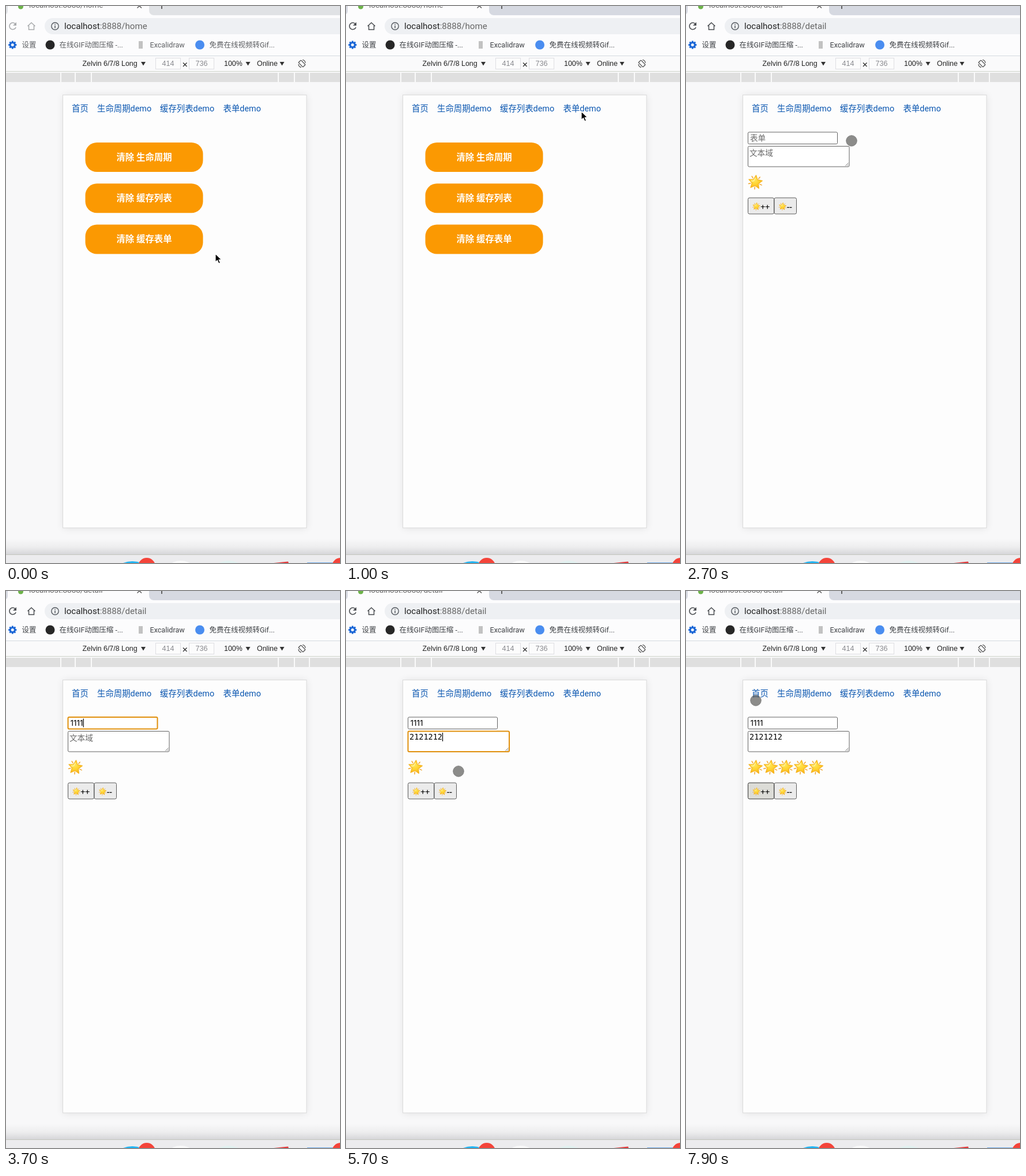
An HTML page that plays this animation: 579 by 967 pixels, repeating every 8000 ms.

```html
<!DOCTYPE html>
<html lang="zh-CN">
<head>
<meta charset="utf-8">
<title>Form cache demo</title>
<style>
html, body { margin: 0; width: 100%; height: 100%; overflow: hidden; background: #f8f8f9; }
svg { display: block; width: 100%; height: 100%; }
text { font-family: Roboto, "Noto Sans CJK SC", "Noto Sans CJK", sans-serif; white-space: pre; }
.arial { font-family: "Liberation Sans", Arial, sans-serif; }
.inter { font-family: Inter, Roboto, sans-serif; }
.mono { font-family: "DejaVu Sans Mono", monospace; }
</style>
</head>
<body>
<svg id="stage" viewBox="0 0 579 967" preserveAspectRatio="none"></svg>
<script>
const stage = document.getElementById('stage');
const LOOP = 8000;

// Markup helpers
const rect = (x, y, w, h, fill, more = '') =>
  `<rect x="${x}" y="${y}" width="${w}" height="${h}" fill="${fill}" ${more}/>`;
const disc = (x, y, r, fill, more = '') =>
  `<circle cx="${x}" cy="${y}" r="${r}" fill="${fill}" ${more}/>`;
const path = (d, more) => `<path d="${d}" ${more}/>`;
const line = (d, color, width = 1, more = '') =>
  path(d, `fill="none" stroke="${color}" stroke-width="${width}" ${more}`);
const label = (x, y, size, fill, str, more = '') =>
  `<text x="${x}" y="${y}" font-size="${size}" fill="${fill}" ${more}>${str}</text>`;
const group = (id, body, more = '') => `<g id="${id}" ${more}>${body}</g>`;
const caretDown = (x, y) => path(`M${x - 4} ${y - 3}h8l-4 6.5z`, 'fill="#333"');

function polar(r, turn) {
  const a = (turn - 0.25) * 2 * Math.PI;
  return `${(r * Math.cos(a)).toFixed(2)} ${(r * Math.sin(a)).toFixed(2)}`;
}

function starSymbol() {
  let body = 'M', rays = '';
  for (let i = 0; i < 5; i++) {
    body += `${polar(12.3, i / 5)}L${polar(5.9, (i + .5) / 5)}${i < 4 ? 'L' : 'z'}`;
    rays += `M${polar(8.4, (i + .5) / 5)}L${polar(12, (i + .5) / 5)}`;
  }
  return `<g id="star">${line(rays, '#f0a52c', 1.5, 'stroke-linecap="round"')}` +
    path(body, 'fill="url(#gold)" stroke="#f6b41f" stroke-width="1.2" stroke-linejoin="round"') +
    path('M-1 -7L-3 -2L-7 -1.5', 'fill="none" stroke="#fff3a0" stroke-width="1.4" stroke-linecap="round"') + '</g>';
}

const star = (x, y, s = 1) => `<use href="#star" transform="translate(${x} ${y}) rotate(6) scale(${s})"/>`;

function gear(x, y) {
  let teeth = '';
  for (let i = 0; i < 8; i++) teeth += `M${polar(4, i / 8)}L${polar(7, i / 8)}`;
  return `<g transform="translate(${x} ${y})">${line(teeth, '#1a66d6', 2.8)}` +
    disc(0, 0, 4, 'none', 'stroke="#1a66d6" stroke-width="3"') + '</g>';
}

const defs = `<defs>
  <radialGradient id="gold" cx=".42" cy=".38" r=".65">
    <stop offset="0" stop-color="#ffe75a"/><stop offset=".6" stop-color="#ffd02c"/><stop offset="1" stop-color="#f7ac1b"/>
  </radialGradient>
  <linearGradient id="fade" x2="0" y2="1">
    <stop offset="0" stop-color="#f8f8f9"/><stop offset=".55" stop-color="#ededee"/><stop offset="1" stop-color="#d6d6d9"/>
  </linearGradient>
  <filter id="soft" x="-10%" y="-10%" width="120%" height="120%"><feGaussianBlur stdDeviation="7"/></filter>
  ${starSymbol()}
</defs>`;

const browser =
  rect(0, 0, 579, 17, '#dadde2', 'id="strip"') +
  path('M3 0H248V7Q248 16 257 16H579V86H0V14Q3 13 3 8z', 'fill="#fcfcfd"') +
  disc(25.5, 1, 4.5, '#6db34a') +
  label(40, 3, 13.5, '#666', '', 'id="tab"') +
  line('M227.5 -4L235 3.5M235 -4L227.5 3.5', '#555', 1.4) +
  line('M270 -4V5', '#444', 1.6) +
  rect(67, 21, 530, 28, '#eef0f3', 'rx="14"') +
  group('tools',
    line('M16.3 31.2A5.8 5.8 0 1 0 17.2 37', 'currentColor', 1.6) +
    path('M18 28v6h-6z', 'fill="currentColor"') +
    line('M37.5 35L44 29L50.5 35M39.5 34V41H48.5V34', 'currentColor', 1.5)) +
  disc(85, 35, 6.2, 'none', 'stroke="#555a60" stroke-width="1.4"') +
  line('M85 34V38.5M85 31.2V32.7', '#555a60', 1.5) +
  label(101, 40, 15.1, '#222', '', 'id="url"') +
  gear(11.3, 67.5) +
  disc(76.5, 67.5, 8, '#272727') +
  rect(230, 61, 7, 13, '#c2c2c2') +
  disc(336, 67.5, 8, '#4a8df0') +
  group('marks',
    label(27.5, 71.7, 12.5, 'currentColor', '设置') +
    label(92.5, 71.7, 12.5, 'currentColor', '在线GIF动图压缩 -...') +
    label(249.5, 71.7, 12.6, 'currentColor', 'Excalidraw') +
    label(352.5, 71.7, 12.5, 'currentColor', '免费在线视频转Gif...'));

const sizeBox = (x, str) =>
  rect(x + .5, 90.5, 43, 19, '#fcfcfc', 'stroke="#dedee2"') +
  label(x + 22, 104.3, 12.6, '#88898e', str, 'class="arial" text-anchor="middle"');

const small = (x, str) => label(x, 104.2, 12.4, '#222', str, 'class="arial"');

const devtools =
  rect(0, 86, 579, 28, '#fafafb') +
  line('M0 86.5H579', '#d3dbe0') +
  line('M0 113.5H579', '#cdd2c9') +
  small(132.5, 'Zelvin 6/7/8 Long') + caretDown(238, 100) +
  sizeBox(259, '414') + line('M307 98.5L313.5 105M313.5 98.5L307 105', '#333', 1.4) + sizeBox(317, '736') +
  small(378, '100%') + caretDown(419.5, 100) +
  small(435, 'Online') + caretDown(478.5, 100) +
  `<g transform="rotate(-45 513 100)">${rect(510, 94.5, 6, 11, 'none', 'rx="1" stroke="#444" stroke-width="1.2"')}</g>` +
  line('M507 101Q507.5 106 512 106.5M514 93.5Q518.5 94 519 99', '#444', 1.1) +
  rect(0, 116, 579, 16, '#dfdfdf') +
  [95, 120, 148, 472, 500, 526].map(x => rect(x - 1, 116, 2, 16, '#fafafa')).join('');

const dock =
  rect(0, 925, 579, 27, 'url(#fade)') +
  rect(0, 952, 579, 15, '#ececee') +
  line('M0 952.5H579', '#c3c6bd') +
  disc(219, 1008, 44, '#1fb4f3') +
  disc(303, 994, 31, '#fafafa') +
  disc(386, 1000, 37, '#e2f1f0') +
  path('M464 967L489 964.5L490 967z', 'fill="#e2383a"') +
  rect(522, 966, 45, 1, '#6fa9e6') +
  disc(244, 973, 15, '#f4443a') +
  disc(580, 973, 15, '#f4443a');

const nav = [[114, '首页'], [158, '生命周期demo'], [267, '缓存列表demo'], [376.5, '表单demo']]
  .map(([x, str]) => label(x, 182.7, 14.4, '#0a56b0', str)).join('');

const phone =
  rect(99, 155, 422, 752, '#000', 'opacity=".09" filter="url(#soft)"') +
  rect(98.5, 154.5, 422.5, 751.5, '#fdfdfd', 'stroke="#dadada"') + nav;

const home = ['生命周期', '缓存列表', '缓存表单'].map((str, i) => {
  const y = 237 + i * 71.3;
  return rect(137.5, y, 204, 51, '#fb9902', 'rx="20"') +
    label(239.5, y + 30.6, 15.4, '#fff', '清除 ' + str, 'font-weight="700" text-anchor="middle"');
}).join('');

const stepButton = (id, x, w, sign) =>
  rect(x, 333, w, 28, '#ebebeb', `id="${id}" rx="2.5" stroke="#5a5a5a"`) +
  star(x + 14.5, 348, .54) +
  label(x + 21.7, 352.5, 13.6, '#000', sign, 'class="arial" stroke="#000" stroke-width=".25"');

const form =
  rect(107.5, 219, 155, 20.5, '#fff', 'id="field" rx="2"') +
  label(111, 234, 13.6, '#6a6a6a', '表单', 'id="hint1"') +
  label(111.5, 234, 13.6, '#000', '', 'id="value1" class="inter"') +
  rect(107.5, 243.5, 175.5, 35.5, '#fff', 'id="area" rx="2"') +
  line('M276.5 277.5L281.5 272.5M279.5 277.5L281.5 275.5', '#777') +
  label(110, 260.2, 13.6, '#6a6a6a', '文本域', 'id="hint2"') +
  label(110, 258.3, 13.5, '#000', '', 'id="value2" class="mono"') +
  rect(0, 0, 1.2, 15, '#000', 'id="caret"') +
  [0, 1, 2, 3, 4].map(i => `<g class="score">${star(120.2 + i * 26.3, 306)}</g>`).join('') +
  stepButton('plus', 107.5, 45, '++') +
  stepButton('minus', 153, 38.5, '--');

const pointers =
  group('arrow', path('M0 0V14.6L3.4 11.5L5.8 17L8.4 15.9L6 10.5H10.6z',
    'fill="#000" stroke="#fff" stroke-width="1.1" stroke-linejoin="round"')) +
  group('touch', disc(0, 0, 9.3, '#474743', 'fill-opacity=".62" stroke="#777" stroke-width=".8"'));

stage.innerHTML = defs + rect(0, 0, 579, 967, '#f8f8f9') + browser + devtools + dock + phone +
  group('home', home) + group('form', form) + pointers;

const el = {};
stage.querySelectorAll('[id]').forEach(n => el[n.id] = n);
const scores = stage.querySelectorAll('.score');

// Pointer stops: time, x, y
const moves = [
  [100, 363, 430], [900, 408, 183], [1500, 408, 183], [1800, 400, 190], [2200, 322, 234],
  [2500, 320, 234], [2700, 287, 234], [3100, 205, 234], [3900, 205, 234], [4300, 200, 262],
  [5400, 200, 262], [5700, 195, 313], [6200, 140, 348], [7300, 140, 348], [7900, 121, 190]
];
const PAGE = 1400, FOCUS1 = 3100, FOCUS2 = 4300, BLUR = 6500;
const clicks = [6500, 6700, 6800, 7000];
const keys1 = [3500, 3600, 3600, 3700];

function pointerAt(t) {
  const i = moves.findIndex(m => m[0] > t);
  if (i === 0) return moves[0].slice(1);
  if (i < 0) return moves[moves.length - 1].slice(1);
  const [t0, x0, y0] = moves[i - 1], [t1, x1, y1] = moves[i];
  const p = (t - t0) / (t1 - t0), e = p * p * (3 - 2 * p);
  return [x0 + (x1 - x0) * e, y0 + (y1 - y0) * e];
}

const show = (node, on) => node.setAttribute('display', on ? 'inline' : 'none');
const set = (node, attrs) => Object.entries(attrs).forEach(([k, v]) => node.setAttribute(k, v));
const count = (times, t) => times.filter(k => t >= k).length;
const border = (node, on) => set(node, { stroke: on ? '#e08f0b' : '#626262', 'stroke-width': on ? 2 : 1 });

function update(now) {
  const t = Math.floor(now % LOOP / 100) * 100;
  const active = t >= 900, detail = t >= PAGE;
  const route = detail ? 'detail' : 'home';

  el.tab.textContent = 'localhost:8888/' + route;
  el.url.innerHTML = `localhost<tspan fill="#666">:8888/${route}</tspan>`;
  el.tools.setAttribute('color', active ? '#4a4d51' : '#a9abad');
  el.marks.setAttribute('color', active ? '#3c3f43' : '#5c5e61');
  el.strip.setAttribute('fill', active ? '#d6d9e1' : '#e0e2e5');
  show(el.home, !detail);
  show(el.form, detail);

  const first = '1'.repeat(count(keys1, t));
  const typed = Math.max(0, Math.min(7, Math.floor((t - 4600) / 100)));
  el.value1.textContent = first;
  el.value2.textContent = '2121212'.slice(0, typed);
  show(el.hint1, !first);
  show(el.hint2, !typed);

  const in1 = t >= FOCUS1 && t < FOCUS2, in2 = t >= FOCUS2 && t < BLUR;
  border(el.field, in1);
  border(el.area, in2);

  // The caret blinks every half second after the last key
  const lastKey = in1 ? (t < 3500 ? FOCUS1 : Math.min(t, 3700)) : (t < 4700 ? FOCUS2 : Math.min(t, 5300));
  show(el.caret, (in1 || in2) && Math.floor((t - lastKey) / 500) % 2 === 0);
  set(el.caret, in1
    ? { x: 111 + (first ? el.value1.getComputedTextLength() + .5 : 0), y: 221.5 }
    : { x: 110 + typed * 8.13, y: 246 });

  const total = 1 + count(clicks, t);
  scores.forEach((s, i) => show(s, i < total));
  set(el.plus, t >= 7000 ? { fill: '#dcdcd7', stroke: '#333' } : { fill: '#ebebeb', stroke: '#5a5a5a' });

  const typing = (t >= 3500 && t < 3900) || (t >= 4500 && t < 5400);
  const at = `translate(${pointerAt(t).join(' ')})`;
  el.arrow.setAttribute('transform', at);
  el.touch.setAttribute('transform', at);
  show(el.arrow, !detail);
  show(el.touch, detail && !typing);
}

const start = performance.now();
function tick() {
  update(performance.now() - start);
  requestAnimationFrame(tick);
}
tick();
</script>
</body>
</html>
```
